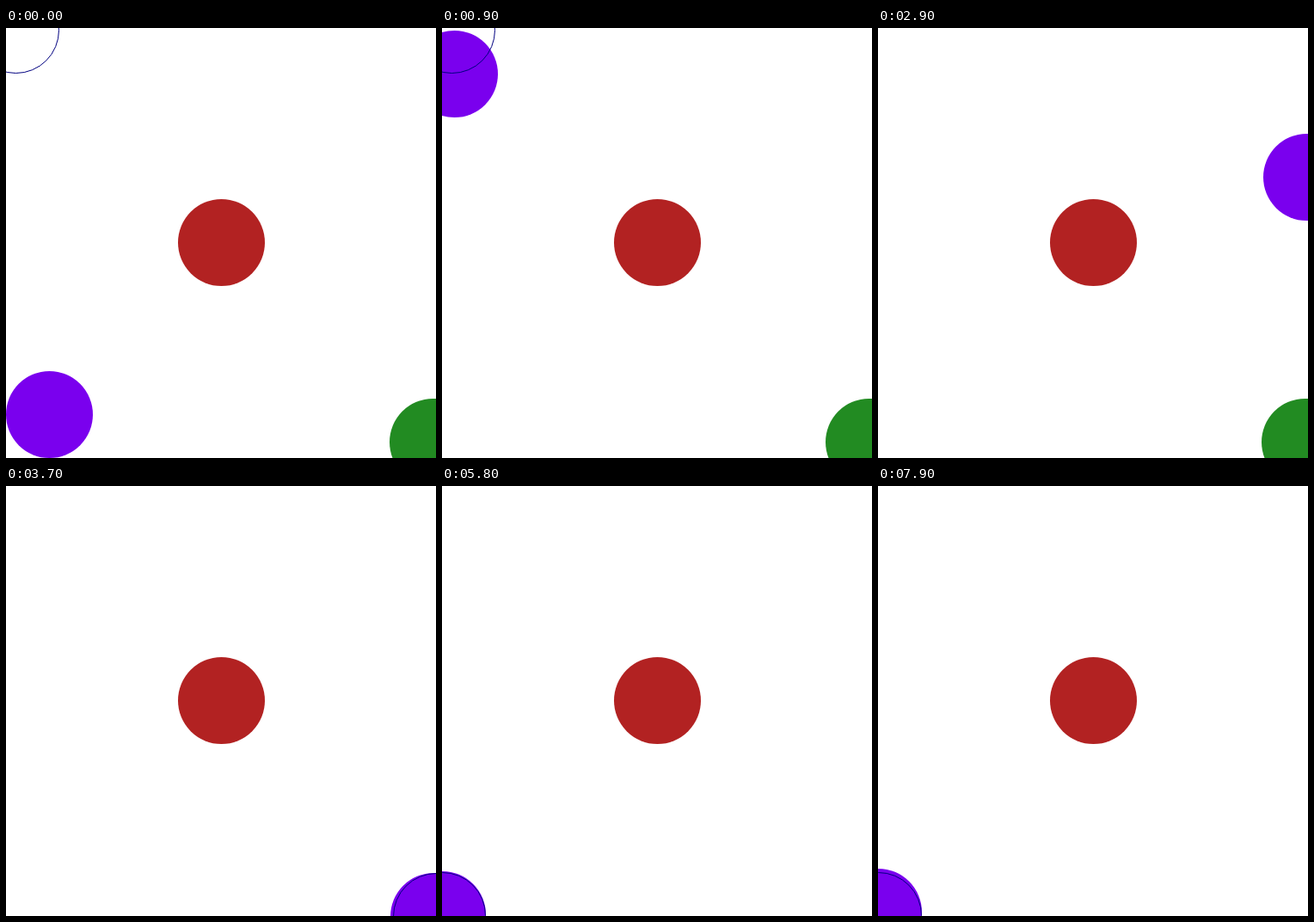
Animation, 500 px wide and 500 px high, one loop 8000 ms. Source, as an HTML page with a canvas:

```html
<!DOCTYPE html>
<html>
<head>
<meta charset="utf-8">
<style>
html, body { margin: 0; width: 100%; height: 100%; overflow: hidden; background: #fff; }
canvas { display: block; }
</style>
</head>
<body>
<canvas id="stage" width="500" height="500"></canvas>
<script>
const ctx = document.getElementById('stage').getContext('2d');
const LOOP = 8000, STEP = 100;

const easeIn = u => 1 - Math.cos(u * Math.PI / 2);
const linear = u => u;

// Ball path: time, x, y, and the easing used to get there
const path = [
  [-27, 50, 449],
  [973, 9, 2, easeIn],
  [1265, 11, 2, linear],
  [2265, 500, -4, easeIn],
  [2352, 500, -1, linear],
  [3352, 495, 500, easeIn],
  [4147, 500, 500, linear],
  [5147, 0, 495, easeIn],
  [5400, 4, 494, linear],
  [5800, 0, 498, linear],
  [6300, 4, 497, linear],
  [6800, 6, 496, linear],
  [7200, 0, 496, linear],
  [7600, 0, 494, linear],
  [7900, 0, 495, linear],
  [8000, 0, 495, linear]
];

// Goal ring: time of appearance, x, y
const goals = [
  [0, 11, 2],
  [1265, 500, -1],
  [2352, 500, 500],
  [4147, 0, 499]
];

function ballAt(t) {
  const i = path.findIndex((p, k) => k > 0 && t <= p[0]);
  const [t0, x0, y0] = path[i - 1];
  const [t1, x1, y1, ease] = path[i];
  const u = ease((t - t0) / (t1 - t0));
  return [Math.round(x0 + (x1 - x0) * u), Math.round(y0 + (y1 - y0) * u)];
}

function circle(x, y, r) {
  ctx.beginPath();
  ctx.arc(x + 0.5, y + 0.5, r, 0, Math.PI * 2);
}

function disc(x, y, color) {
  circle(x, y, 50.5);
  ctx.fillStyle = color;
  ctx.fill();
}

function ring(x, y) {
  circle(x, y, 50);
  ctx.strokeStyle = '#000080';
  ctx.lineWidth = 1;
  ctx.stroke();
}

function draw(t) {
  ctx.fillStyle = '#fff';
  ctx.fillRect(0, 0, 500, 500);
  disc(...ballAt(t), '#7a00ee');
  const [, gx, gy] = goals.filter(g => g[0] <= t).pop();
  ring(gx, gy);
  if (t < 3352) disc(496, 481, '#228b22');
  disc(250, 249, '#b22222');
}

const start = performance.now();
function tick() {
  const t = (performance.now() - start) % LOOP;
  draw(Math.floor(t / STEP) * STEP);
  requestAnimationFrame(tick);
}
tick();
</script>
</body>
</html>
```
